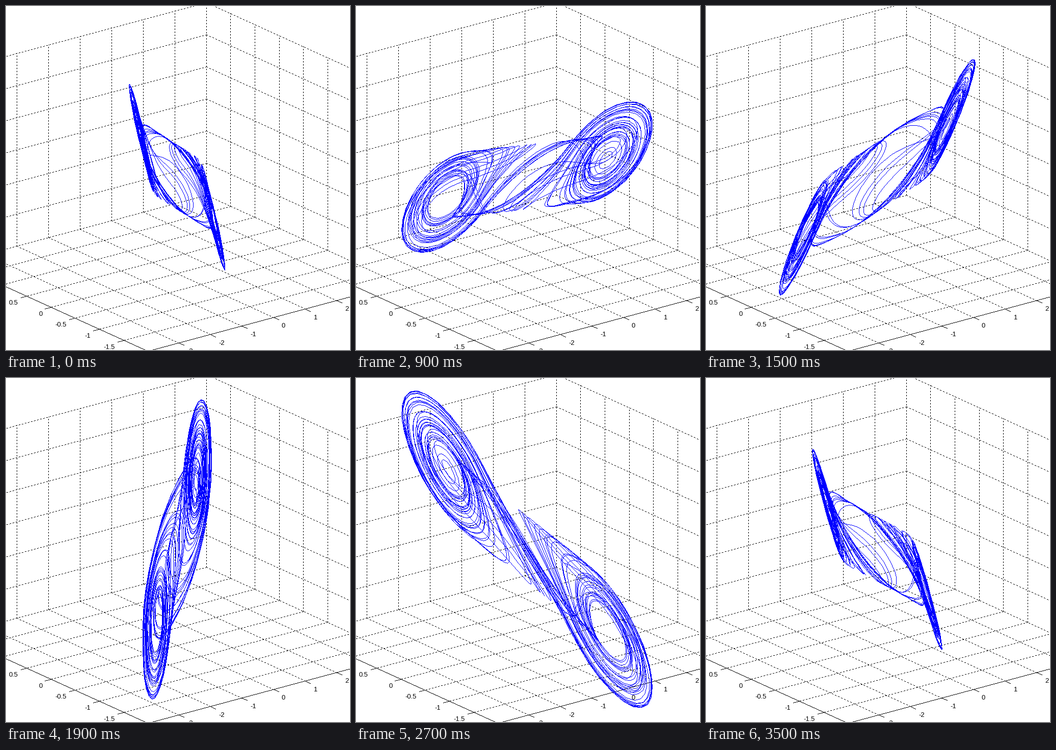
These frames come from a looping animation (675 by 675 pixels, 3.6 s). A matplotlib script:

```python
import numpy as np
import matplotlib as mpl
import matplotlib.pyplot as plt
from matplotlib.animation import FuncAnimation

SIZE, DPI = 675, 100
FRAMES, INTERVAL = 36, 100
FONT_PX = 13
BLACK, BLUE = (0, 0, 0), (0, 0, 255)

mpl.rcParams["font.family"] = "Liberation Sans"

# Orthographic view, stretched to the figure
AZ, EL = np.radians(37.5), np.radians(30)
WIDTH, HEIGHT = 625, 437
X_MAX, Y_MAX, Z_MAX = 4, 2, 3
CENTER = np.array([335.2, 335.0])
BASIS = np.array([
    [WIDTH * np.cos(AZ), -HEIGHT * np.sin(AZ) * np.sin(EL)],
    [-WIDTH * np.sin(AZ), -HEIGHT * np.cos(AZ) * np.sin(EL)],
    [0, -HEIGHT * np.cos(EL)],
]) / np.array([[2 * X_MAX], [2 * Y_MAX], [2 * Z_MAX]])


def project(points):
    return CENTER + np.asarray(points, float) @ BASIS


# Chua's circuit
ALPHA, BETA = 15.6, 28
M0, M1 = -1.143, -0.714


def chua(s):
    x, y, z = s
    h = M1 * x + 0.5 * (M0 - M1) * (abs(x + 1) - abs(x - 1))
    return np.array([ALPHA * (y - x - h), x - y + z, -BETA * y])


# Dormand-Prince tableau, error weights and dense output
STAGES = [
    [1/5],
    [3/40, 9/40],
    [44/45, -56/15, 32/9],
    [19372/6561, -25360/2187, 64448/6561, -212/729],
    [9017/3168, -355/33, 46732/5247, 49/176, -5103/18656],
    [35/384, 0, 500/1113, 125/192, -2187/6784, 11/84],
]
ERROR = [71/57600, 0, -71/16695, 71/1920, -17253/339200, 22/525, -1/40]
DENSE = np.array([
    [1, -183/64, 37/12, -145/128],
    [0, 0, 0, 0],
    [0, 1500/371, -1000/159, 1000/371],
    [0, -125/32, 125/12, -375/64],
    [0, 9477/3392, -729/106, 25515/6784],
    [0, -11/7, 11/3, -55/28],
    [0, 3/2, -4, 5/2],
])


def combine(slopes, weights):
    # summed in order: the orbit is chaotic, so rounding matters
    total = np.zeros(3)
    for slope, weight in zip(slopes, weights):
        total = total + slope * weight
    return total


def solve(rhs, start, t_end, rtol=1e-3, atol=1e-6, refine=4):
    """Adaptive 4(5) integration with `refine` points per step."""
    floor, power, h_max = atol / rtol, 1 / 5, 0.1 * t_end
    t, y = 0.0, np.array(start, float)
    path, first = [y], rhs(y)
    rate = np.max(np.abs(first / np.maximum(np.abs(y), floor)))
    h = min(h_max, 1 / (rate / (0.8 * rtol ** power)))
    done = False
    while not done:
        h_min = 16 * np.spacing(t)
        h = min(h_max, max(h_min, h))
        if 1.1 * h >= t_end - t:
            h, done = t_end - t, True
        failed = False
        while True:
            f = [first]
            for row in STAGES:
                y_new = y + combine(f, [h * w for w in row])
                f.append(rhs(y_new))
            scale = np.maximum(np.maximum(np.abs(y), np.abs(y_new)), floor)
            err = h * np.max(np.abs(combine(f, ERROR) / scale))
            if err <= rtol:
                break
            shrink = 0.5 if failed else max(0.1, 0.8 * (rtol / err) ** power)
            h, failed, done = max(h_min, h * shrink), True, False
        for k in range(1, refine):
            s = (k / refine) ** np.arange(1, 5)
            path.append(y + combine(f, h * DENSE @ s))
        path.append(y_new)
        t, y, first = t + h, y_new, f[-1]
        if not failed:
            h /= max(0.2, 1.25 * (err / rtol) ** power)
    return np.array(path)


def trace(points):
    """Pixels of a hairline polyline, one per step along the longer axis."""
    p = np.rint(points)
    d = np.diff(p, axis=0)
    n = np.maximum(1, np.abs(d).max(axis=1)).astype(int)
    seg = np.repeat(np.arange(len(n)), n)
    step = np.arange(n.sum()) - np.repeat(np.cumsum(n) - n, n)
    pixels = p[seg] + d[seg] * (step / n[seg])[:, None]
    return np.floor(np.vstack([pixels, p[-1:]]) + 0.5).astype(int)


def paint(canvas, pixels, color):
    x, y = pixels[((pixels >= 0) & (pixels < SIZE)).all(axis=1)].T
    canvas[y, x] = color


backdrop = np.full((SIZE, SIZE, 3), 255, np.uint8)


def stroke(a, b):
    paint(backdrop, trace([a, b]), BLACK)


def grid(a, b):
    pixels = trace(project([a, b]))
    paint(backdrop, pixels[np.arange(len(pixels)) % 6 < 3], BLACK)


fig = plt.figure(figsize=(SIZE / DPI, SIZE / DPI), dpi=DPI, facecolor="white")
ax = fig.add_axes([0, 0, 1, 1])
ax.axis("off")


def label(pos, value, ha):
    ax.text(*pos, f"{value:g}", ha=ha, va="baseline",
            fontsize=FONT_PX * 72 / DPI, color="black")


for x in range(-X_MAX, X_MAX + 1):
    back = (x, Y_MAX, -Z_MAX)
    grid(back, (x, Y_MAX, Z_MAX))
    if x > -X_MAX:
        grid(back, (x, -Y_MAX, -Z_MAX))
for y in np.arange(-Y_MAX, Y_MAX + 0.5, 0.5):
    back = (X_MAX, y, -Z_MAX)
    if y < Y_MAX:
        grid(back, (X_MAX, y, Z_MAX))
    if y > -Y_MAX:
        grid(back, (-X_MAX, y, -Z_MAX))
for z in range(-Z_MAX, Z_MAX + 1):
    corner = (X_MAX, Y_MAX, z)
    grid(corner, (-X_MAX, Y_MAX, z))
    grid(corner, (X_MAX, -Y_MAX, z))

front = project((-X_MAX, -Y_MAX, -Z_MAX))
stroke(front, project((X_MAX, -Y_MAX, -Z_MAX)))
stroke(front, project((-X_MAX, Y_MAX, -Z_MAX)))
for x in range(-3, 3):
    p = project((x, -Y_MAX, -Z_MAX))
    stroke(p, p + (10, 4.5))
    label(p + (15, 20), x, "left")
for y in np.arange(-1.5, 1, 0.5):
    p = project((-X_MAX, y, -Z_MAX))
    stroke(p, p + (-11, 3))
    label(p + (-16.5, 16.5), y, "right")

orbit = solve(chua, [0.7, 0, 0], 100)
screen = ax.imshow(backdrop, interpolation="nearest", aspect="auto")


def draw(i):
    a = np.radians(10 * (i + 1))
    x, y, z = orbit.T
    turned = np.column_stack([x * np.cos(a) - y * np.sin(a),
                              x * np.sin(a) + y * np.cos(a), z])
    canvas = backdrop.copy()
    paint(canvas, trace(project(turned)), BLUE)
    screen.set_data(canvas)
    return screen,


anim = FuncAnimation(fig, draw, frames=FRAMES, interval=INTERVAL, repeat=True)
plt.show()
```
